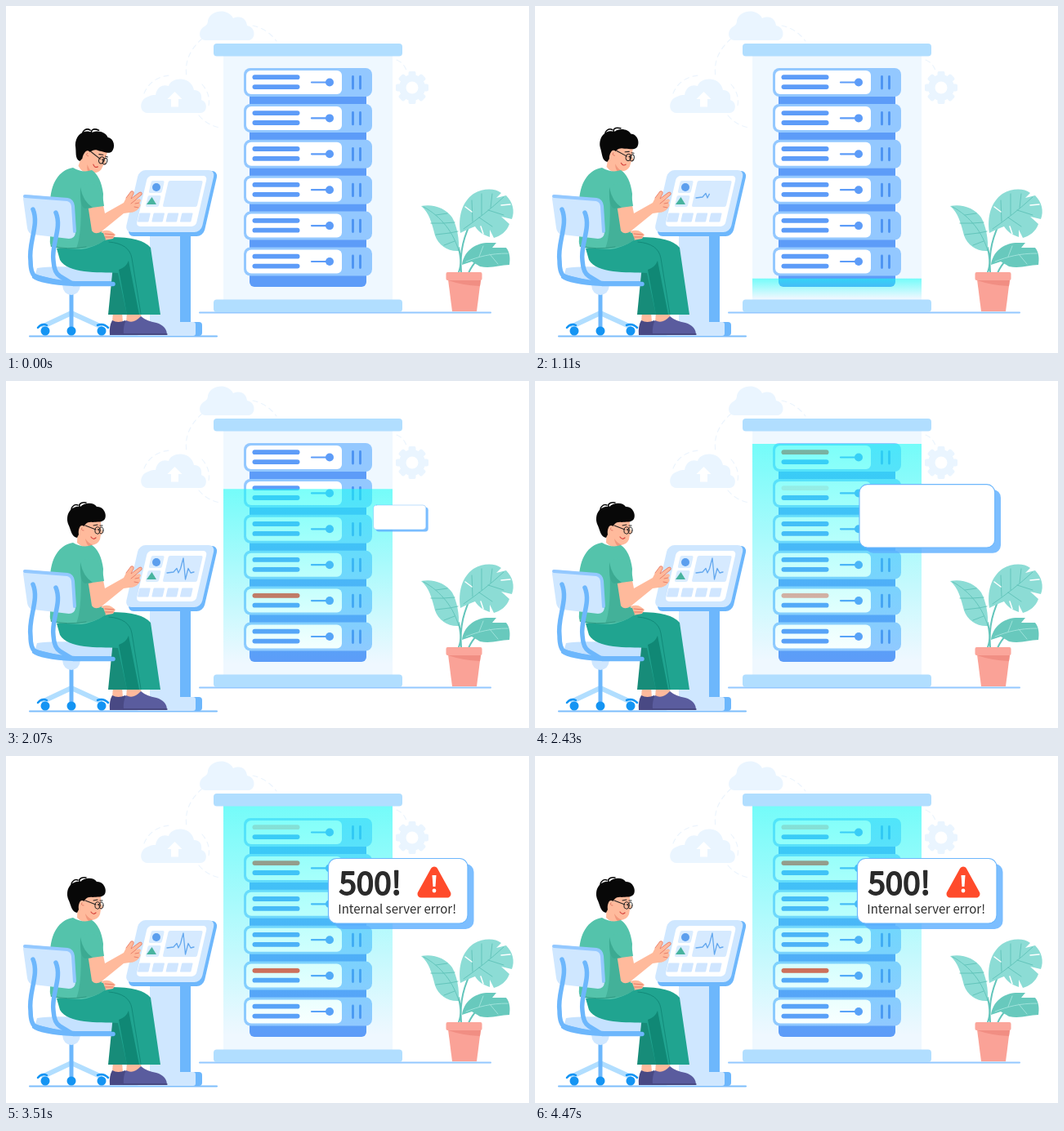
An HTML page with a canvas that plays this animation: 640 px wide and 425 px high, repeating every 4500 ms.

```html
<!DOCTYPE html>
<html lang="en">
<head>
<meta charset="utf-8">
<title>Server check</title>
<style>
html, body { margin: 0; width: 100%; height: 100%; overflow: hidden; background: #fff; }
canvas { display: block; width: 640px; height: 425px; }
</style>
</head>
<body>
<canvas id="stage" width="640" height="425"></canvas>
<script>
const ctx = document.getElementById('stage').getContext('2d');
const LOOP = 4500, TAU = Math.PI * 2;
const BLUE = '#5d9cf8', MID = '#6db7fc', SKY = '#93c8ff', PALE = '#cfe7ff', MIST = '#eaf5ff';
const SKIN = '#ffba9c', RED = '#f0563f', BLACK = '#080808';
const SANS = '"Noto Sans CJK SC", "Noto Sans CJK JP", "Noto Sans", sans-serif';

const clamp = (v, lo = 0, hi = 1) => Math.min(hi, Math.max(lo, v));
const ramp = (t, a, b) => { const x = clamp((t - a) / (b - a)); return x * x * (3 - 2 * x); };

// Smooth curve through [time, value] keys, flat at both ends.
function curve(t, keys) {
  const last = keys.length - 1;
  if (t <= keys[0][0]) return keys[0][1];
  if (t >= keys[last][0]) return keys[last][1];
  const i = keys.findIndex(k => k[0] > t) - 1;
  const slope = j => j <= 0 || j >= last ? 0
    : (keys[j + 1][1] - keys[j - 1][1]) / (keys[j + 1][0] - keys[j - 1][0]);
  const [t0, a] = keys[i], [t1, b] = keys[i + 1], d = t1 - t0, x = (t - t0) / d;
  const h = x * x * (3 - 2 * x);
  return a + (b - a) * h + d * x * (1 - x) * ((1 - x) * slope(i) - x * slope(i + 1));
}

function shape(d, fill, stroke, width = 1) {
  const path = new Path2D(d);
  if (fill) { ctx.fillStyle = fill; ctx.fill(path); }
  if (stroke) { ctx.strokeStyle = stroke; ctx.lineWidth = width; ctx.stroke(path); }
}
const line = (d, color, width) => shape(d, null, color, width);
function box(x, y, w, h, r, fill, stroke, width = 1) {
  ctx.beginPath();
  ctx.roundRect(x, y, w, h, r);
  if (fill) { ctx.fillStyle = fill; ctx.fill(); }
  if (stroke) { ctx.strokeStyle = stroke; ctx.lineWidth = width; ctx.stroke(); }
}
function dot(x, y, r, fill) {
  ctx.beginPath();
  ctx.arc(x, y, r, 0, TAU);
  ctx.fillStyle = fill;
  ctx.fill();
}
function group(draw, { x = 0, y = 0, turn = 0, scale = 1, dx = 0, dy = 0 } = {}) {
  ctx.save();
  ctx.translate(x + dx, y + dy);
  ctx.rotate(turn);
  ctx.scale(scale, scale);
  ctx.translate(-x, -y);
  draw();
  ctx.restore();
}

function backdrop() {
  ctx.setLineDash([6, 5]);
  line('M240,40C226,52 218,68 221,86M302,24Q320,28 331,43M236,134Q246,146 262,149M169,107C175,92 188,86 200,85M240,96Q252,110 247,126M478,66Q488,70 491,82', '#ebf4fd', 1.1);
  ctx.setLineDash([]);
  shape('M244,42C235,41 235,29 243,25C246,23 247,21 247,18C250,5 271,2 278,15C288,11 294,16 295,24C306,26 306,41 297,42Z', MIST);
  shape('M173,131C162,130 163,114 174,111C178,109 180,109 183,109C185,98 193,96 199,98C203,86 227,86 230,103C238,103 240,109 239,115C248,118 246,131 238,131Z', MIST);
  shape('M206.500,105L215.500,114H211V123.500H202V114H197.500Z', '#fff');
  for (let i = 0; i < 8; i++)
    group(() => box(492.500, 80, 9, 9, 2, MIST), { x: 497, y: 100, turn: i * TAU / 8 });
  dot(497, 100, 16, MIST);
  dot(497, 100, 7.500, '#fff');
  line('M237,375.500H593', SKY, 2);
  line('M29,404.500H258', '#7dbdfc', 2);
}

const blinks = { 0: [2390, 2897], 1: [2130, 3060], 4: [1590, 3030] };
function alertLevel(row, t) {
  const [start, peak] = blinks[row] || [LOOP, 0];
  return t < start ? -1 : clamp(0.55 + 0.95 * Math.cos((t - peak) * TAU / 480));
}

function servers(t) {
  box(266, 58, 207, 304, 0, '#eff8ff');
  box(298, 96, 143, 248, 6, BLUE);
  for (let row = 0; row < 6; row++) {
    const y = 76 + row * 43.9, level = alertLevel(row, t);
    box(291, y, 157, 35, 8, SKY);
    box(294, y + 3, 117, 29, 6, '#fff');
    ctx.globalAlpha = level < 0 ? 1 : level;
    box(301.500, y + 8.300, 58, 5.800, 3, level < 0 ? BLUE : RED);
    ctx.globalAlpha = 1;
    box(301.500, y + 20.200, 58, 5.800, 3, BLUE);
    line(`M374,${y + 17.500}H396`, BLUE, 2.200);
    dot(396, y + 17.500, 5, BLUE);
    line(`M424.500,${y + 10.500}v14.500m9,0v-14.500`, '#4b92f2', 2.800);
  }
  const top = curve(t, [[760, 360], [1110, 334], [1680, 210], [2160, 116], [2430, 77], [2700, 61]]);
  if (top < 360) {
    const glow = ctx.createLinearGradient(0, top, 0, 360);
    glow.addColorStop(0, 'rgba(20,255,245,.56)');
    glow.addColorStop(0.94, 'rgba(20,255,245,0)');
    box(266, top, 207, 360 - top, 0, glow);
  }
  box(254, 46, 231, 15.500, 4, '#b1deff');
  box(254, 359.500, 231, 15.500, 4, '#b1deff');
}

function plant() {
  const leaf = '#8cdcd5', vein = '#63c5bb';
  line('M554,326C558,316 556,306 554,296M557,326C555,300 560,282 572,258M566,327Q570,318 576,312', vein, 2);
  shape('M508,245C522,242 538,247 546,259C552,270 555,286 554,300C541,301 529,293 525,281C521,266 518,253 508,245Z', leaf);
  line('M511,246C533,258 548,278 554,300M526,256L540,254M535,266L549,265M520,266L535,266M543,278L553,276M526,280L543,278M536,293L549,288', vein, 1);
  shape('M556,278C553,258 558,240 572,230C584,223 598,223 606,229L600,235L612,232C620,240 623,251 619,261L606,258L616,267C613,276 605,282 597,284L592,274L592,283C583,280 578,276 574,270C568,272 562,275 556,278Z', leaf);
  line('M560,273C576,262 594,248 609,234M571,264L570,238M582,256L582,230M593,247L595,230M579,259L595,270M590,250L609,256', vein, 1);
  line('M562,246L570,252M617,243L606,244M584,279L581,270', '#fff', 1.500);
  shape('M558,317C560,301 573,291 588,290L600,290L595,296L612,296C617,302 617,310 616,317C604,317 594,322 580,319L570,313Z', '#68c9bd');
  line('M563,313C578,307 593,303 614,303M579,307L584,294M592,304L602,316', '#9ee2da', 1);
  shape('M541,335H581L576,374H546Z', '#faa297');
  shape('M541,336H581L580,343Q558,342 541,336Z', '#f18e83');
  box(538.500, 326, 44, 10, 2, '#fba69b');
}

const pulse = [[197, 235], [205, 234], [209, 229.500], [211, 235], [213.500, 230], [217, 217],
  [219.500, 243], [223, 229.500], [226, 235], [230, 234]];
const pulsePath = 'M' + pulse.join('L');
const pulseLength = pulse.slice(1).reduce((sum, p, i) => sum + Math.hypot(p[0] - pulse[i][0], p[1] - pulse[i][1]), 0);

function desk(t) {
  box(205, 270, 21, 120, 0, MID);
  shape('M176,277H213V390H176Z', PALE);
  box(200, 387, 40, 17, 4, MID);
  box(160, 387, 72, 17, 3, PALE);
  ctx.save();
  ctx.transform(1, 0, -0.23, 1, 46.2, 0);
  box(167, 202, 93, 80, 8, MID);
  box(163, 201, 93, 76, 8, PALE);
  box(175, 208, 73, 62, 5, '#fff');
  box(181, 214, 16, 15, 2, '#d9ecff');
  box(181, 232, 16, 14, 2, '#d9ecff');
  box(202, 214, 42, 32, 2, '#d6eaff');
  for (let i = 0; i < 4; i++) box(175.500 + i * 17.300, 253.500, 13.500, 11, 1, '#d0e6ff');
  ctx.restore();
  dot(184, 222, 5, '#5c9fee');
  shape('M172,243L178.500,234L184,243Z', '#48b49f');
  const drawn = clamp((t - 803) / 1097);
  if (drawn > 0) {
    ctx.setLineDash([pulseLength * drawn, pulseLength + 9]);
    line(pulsePath, '#64a8ee', 1.300);
    ctx.setLineDash([]);
  }
}

function chairBase() {
  line('M80,376L46,392M80,376L115,392', '#b1deff', 6);
  line('M80,352V393', MID, 5);
  for (const x of [48, 80, 117]) dot(x, 398, 5.500, '#1494f3');
  line('M39,394Q44,388 50,391M112,391Q119,388 125,394', '#1494f3', 2.500);
  shape('M69,342H91Q90,353 80,354Q70,353 69,342Z', PALE);
  shape('M32,329Q70,319 127,326Q137,330 134,343H82Q42,341 32,333Z', MID);
  shape('M38,321Q70,316 127,325Q135,328 134,337H85Q52,335 36,328Z', '#c5e2ff');
}

function chairBack() {
  shape('M25,231L75,236Q82,237 83,244L85,278Q84,285 77,285L34,280Q27,279 26,272L21,236Q21,231 25,231Z', PALE);
  line('M23,233L75,237Q81,238 82,245L84,276', SKY, 4);
  line('M33,249C41,268 27,290 30,312Q30,329 37,332L62,338M61,253C69,272 55,292 58,312Q59,327 66,331L82,340.500H131', MID, 5.500);
}

function legs() {
  shape('M131,374H142L143,388H130ZM148,374H165L166,389H147Z', SKIN);
  shape('M131,318H158L164,378H125Z', '#178c79');
  shape('M62,297L122,283Q166,282 177,296L189,378H148L137,327C112,326 76,328 66,311Z', '#20a490');
  shape('M138,323Q147,320 150,312L163,378H148Z', '#108875');
  line('M126,289Q151,291 154,309L165,377', '#128a79', 1);
  shape('M130,385Q137,389 146,385L158,403H127Q126,392 130,385Z', '#494984');
  shape('M147,385Q156,390 165,380Q172,386 184,388Q197,392 197,403H144Q143,392 147,385Z', '#5a5c9e');
  line('M144,402H197', '#43437a', 1.500);
}

function head() {
  shape('M88,174L87,198Q96,207 104,201Q112,201 115,194L116,188L118.500,185.500L116,179V168H96Z', SKIN);
  shape('M97,193Q101,199 106,200.500L102,203Q98,200 97,193Z', '#f1987d');
  shape('M87,192C80,191 80,183 76,175C72,162 81,152 91,154C97,148 108,149 111,154C119,153 124,163 121,169C118,174 111,172 106,173C99,172 96,176 95,180C91,175 88,181 89,188Z', BLACK);
  line('M82,160C77,157 83,150 88,152M92,156C87,152 91,148 98,149', BLACK, 1.600);
  shape('M96,178C90,174 88,182 92,186Q95,188 97,185Z', SKIN);
  line('M95,183Q91,183 93,180', '#de7864', 0.900);
  line('M97,177L110,182M107,177L112,176M115,177L118,177', '#222', 1.100);
  ctx.beginPath();
  ctx.ellipse(112, 183, 3.200, 4.200, 0.1, 0, TAU);
  ctx.moveTo(119, 183);
  ctx.ellipse(116.500, 183, 2.500, 4, 0.1, 0, TAU);
  ctx.strokeStyle = '#222';
  ctx.lineWidth = 1;
  ctx.stroke();
  dot(113, 182, 0.9, '#222');
  line('M104,191Q107,195 110,192', '#d6443e', 1.200);
}

function arm(reach) {
  group(() => {
    shape('M99,236L118,239L121,254L144,241L147,235L153,227Q157,226 156,230L153,236L163,228.500Q167,227 166,231L158,238L163,236Q167,238 163,241Q166,244 163,247Q159,253 151,253L144,254L117,276Q109,281 105,275Z', SKIN);
    line('M147,235L153,227Q157,226 156,230L153,236L163,228.500Q167,227 166,231L158,238L153,242M158,242L163,241M157,246L162,247', '#e2705c', 0.8);
  }, { dx: 15 * reach, dy: -3 * reach });
  group(() => {
    shape('M91,222Q98,215 111,219Q119,231 120,245L98,248Q92,247 91,222Z', '#54c3ab');
    shape('M91,222Q94,239 106,247L98,248Q90,249 91,222Z', '#3caa92');
  }, { x: 95, y: 222, turn: -0.2 * reach });
}

function upperBody(t) {
  const reach = t < 1050 ? Math.sin(Math.PI * t / 1050) ** 2 : 0;
  const nod = curve(t, [[0, 0.3], [550, 0.235], [1110, 0.13], [1640, 0]]);
  group(() => {
    shape('M117,276Q125,273 130,277L134,280L131,285L120,287Z', SKIN);
    line('M121,279L132,280M121,283L131,283', '#e2705c', 0.9);
    group(head, { x: 95, y: 202, turn: nod });
    shape('M82,198Q94,205 105,201Q116,208 119,230L117,278L122,286Q108,296 92,298L57,296Q53,294 54,284L54,240C55,218 64,201 82,198Z', '#54c3ab');
    shape('M91,222Q94,240 103,247L105,276L119,278L122,286Q108,297 86,297Q94,277 91,222Z', '#43b199');
    line('M55,294Q75,299 98,295', '#329b84', 1);
    arm(reach);
  }, { x: 80, y: 292, turn: 0.02 * reach });
}

function warning(t) {
  const pop = curve(t, [[2600, 0], [2800, 1.12], [3030, 1.05], [3250, 0.97], [3500, 1]]);
  if (pop <= 0) return;
  group(() => {
    shape('M524,140L540,169H508Z', '#ff4b2b', '#ff4b2b', 9);
    shape('M521.500,146H526.500L525.500,160H522.500Z', '#fff');
    dot(524, 165, 2.400, '#fff');
  }, { x: 524, y: 157, scale: pop });
}

function label(text, x, y, size, alpha, weight = 0) {
  ctx.globalAlpha = alpha;
  ctx.fillStyle = ctx.strokeStyle = '#2b2b2b';
  ctx.font = `${size}px ${SANS}`;
  ctx.fillText(text, x, y);
  if (weight) { ctx.lineWidth = weight; ctx.strokeText(text, x, y); }
  ctx.globalAlpha = 1;
}

function dialog(t) {
  const size = curve(t, [[1980, 0], [2190, 1.06], [2430, 0.972], [2640, 1]]);
  if (size <= 0) return;
  group(() => {
    box(402, 132, 170.500, 80, 10, 'rgba(92,174,255,.8)');
    box(394.500, 125.500, 170.500, 79.500, 10, '#fff', MID, 1.200);
  }, { x: 483, y: 168, scale: size });
  label('500!', 407.500, 169.500, 38.5, ramp(t, 2500, 2750), 1.8);
  label('Internal server error!', 406.300, 193, 15, ramp(t, 2650, 2900));
  warning(t);
}

function frame() {
  const t = performance.now() % LOOP;
  ctx.fillStyle = '#fff';
  ctx.fillRect(0, 0, 640, 425);
  ctx.lineCap = 'round';
  ctx.lineJoin = 'round';
  backdrop();
  servers(t);
  plant();
  desk(t);
  chairBase();
  legs();
  upperBody(t);
  chairBack();
  dialog(t);
  requestAnimationFrame(frame);
}
requestAnimationFrame(frame);
</script>
</body>
</html>
```
